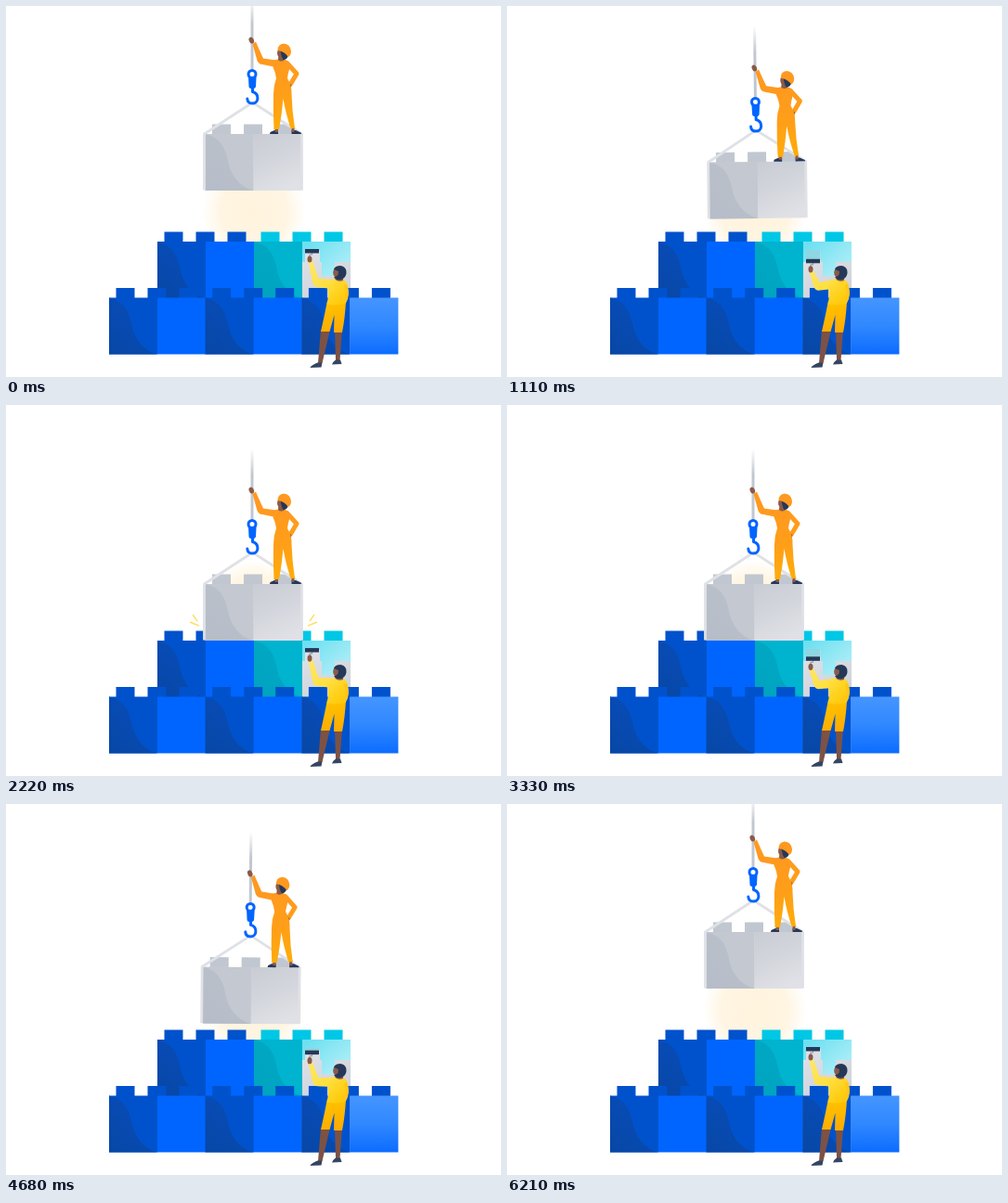
Recreate the animation shown at these times as an HTML page with a canvas. Size 533x400 px, loop 6.24 s.

```html
<!DOCTYPE html>
<html lang="en">
<head>
<meta charset="utf-8">
<title>Building blocks</title>
<style>
html, body { margin: 0; width: 100%; height: 100%; overflow: hidden; background: #fff; }
canvas { display: block; width: 533px; height: 400px; }
</style>
</head>
<body>
<canvas id="stage"></canvas>
<script>
const W = 533, H = 400, LOOP = 6240;
const canvas = document.getElementById('stage');
const dpr = window.devicePixelRatio || 1;
canvas.width = Math.round(W * dpr);
canvas.height = Math.round(H * dpr);
const c = canvas.getContext('2d');

const NAVY = '#253858', BLUE = '#0065ff', DEEP = '#0052cc', SKIN = '#8a5a48';
const clamp = v => Math.max(0, Math.min(1, v));
const span = (t, a, b) => clamp((t - a) / (b - a));
const ease = u => (1 - Math.cos(Math.PI * u)) / 2;

function grad(x0, y0, x1, y1, ...stops) {
  const g = c.createLinearGradient(x0, y0, x1, y1);
  stops.forEach((s, i) => g.addColorStop(i / (stops.length - 1), s));
  return g;
}
function rect(x, y, w, h, fill) {
  c.fillStyle = fill;
  c.fillRect(x, y, w, h);
}
function shape(d, fill) {
  c.fillStyle = fill;
  c.fill(new Path2D(d));
}
function line(d, color, width, cap = 'round') {
  c.strokeStyle = color;
  c.lineWidth = width;
  c.lineCap = cap;
  c.lineJoin = 'round';
  c.stroke(new Path2D(d));
}
function oval(x, y, rx, ry, fill, turn = 0) {
  c.beginPath();
  c.ellipse(x, y, rx, ry, turn, 0, Math.PI * 2);
  c.fillStyle = fill;
  c.fill();
}

// Brick: two halves, a curved shade on the left one, three studs on top
function brick(x, y, look) {
  c.save();
  c.translate(x, y);
  for (let i = 0; i < 3; i++) rect(7.5 + 34 * i, -10.5, 20, 11, look.stud);
  rect(0, 0, 52.3, 61, look.left);
  shape('M0 0C14 3 21 12 24 27C27 45 37 57 52 61L0 61Z', look.shade());
  rect(52, 0, 52, 61, look.right());
  c.restore();
}
const blue = {
  stud: DEEP, left: DEEP,
  shade: () => grad(0, 61, 40, 10, '#0747a6', '#084cb8'),
  right: () => BLUE
};
const sky = { ...blue, right: () => grad(0, 0, 0, 61, '#4595ff', '#3088ff', '#0c6cff') };
const teal = {
  stud: '#00c7e5', left: '#00b3cf',
  shade: () => grad(0, 61, 40, 10, '#00a3bf', '#00a8c4'),
  right: () => grad(0, 0, 52, 61, '#62dff0', '#6fe0f1', '#a5ecf6')
};
const grey = {
  stud: '#c1c7d0', left: '#c3c8d1',
  shade: () => grad(0, 61, 40, 10, '#b6bdc8', '#b9c0ca'),
  right: () => grad(52, 0, 80, 61, '#c9ccd4', '#d3d5dc', '#dfe1e6')
};

function glow() {
  c.save();
  c.beginPath();
  c.rect(205, 170, 125, 84);
  c.clip();
  const g = c.createRadialGradient(267, 222, 0, 267, 222, 56);
  g.addColorStop(0, '#fff3dc');
  g.addColorStop(0.65, '#fff5e2');
  g.addColorStop(1, 'rgba(255,247,232,0)');
  rect(205, 165, 125, 90, g);
  c.restore();
}

function woman() {
  const suit = grad(285, 60, 305, 135, '#ff991f', '#ff9f18', '#ffae08');
  oval(264.3, 37, 2.6, 3.6, SKIN, -0.4);
  shape('M284 138L284.500 136L289 134H293V138Z', NAVY);
  shape('M307.500 134L312 134L317.500 136.500L318 138H307.500Z', NAVY);
  shape('M289.500 130H293V136H289.500ZM307.500 130H310.500V136H307.500Z', SKIN);
  // far arm resting on the hip
  line('M303 62L313 73L306.500 84', suit, 5);
  oval(305, 87, 2, 3, SKIN, 0.5);
  // near arm reaching for the rope
  shape('M265.500 41L269 38.500Q273 48 277 56.500L291 58.500L291 66L273.500 62.500Q271.500 61.500 270.500 59Z', suit);
  shape('M287.500 59Q295 56 302 58.500Q306 60 306 65Q303.500 73 303 78Q308 86 307.500 95Q308 113 311 132H306.500Q301 115 298.500 100Q297 117 294 133H288.500Q287.500 114 288 95Q288 86 291 78Q290 71 287.500 66Z', suit);
  shape('M293.500 52H300V58Q296 61 293 58Z', SKIN);
  oval(295.8, 50.2, 3.7, 5.2, SKIN, 0.15);
  shape('M295.500 47Q303 46 304 53Q303 58 298.500 58Q296 54 295.500 47Z', NAVY);
  shape('M292.500 48Q292.500 41 299 40.500Q306 41 307 48.500Q307 53 304 55Q300 49 292.500 48Z', '#ff991f');
}

function hook() {
  c.beginPath();
  c.arc(265, 73.500, 4, 0, Math.PI * 2);
  c.strokeStyle = BLUE;
  c.lineWidth = 3;
  c.stroke();
  shape('M261 77H269.500L269 87Q268.500 89 266.500 89H264Q261.500 89 261.500 87Z', BLUE);
  line('M265.500 88V92.500C273 94.500 272.500 105 265.500 105C262 105 260 103 259.800 100', BLUE, 3);
}

function load(t) {
  const dy = 55 * (ease(span(t, 170, 1950)) - ease(span(t, 4304, 5306)));
  const turn = -0.011 * Math.sin(Math.PI * span(t, 170, 1950))
    + 0.012 * Math.sin(Math.PI * span(t, 4300, 5900));
  c.save();
  c.translate(265, dy - 150);
  c.rotate(turn);
  c.translate(-265, 150);
  rect(263.500, -8, 3, 78, grad(0, -8, 0, 20, 'rgba(193,199,208,0)', '#c1c7d0'));
  brick(214.500, 138, grey);
  line('M213.500 198.500V138L265.500 104L318.500 138V198.500', '#dfe1e6', 2.8, 'butt');
  hook();
  woman();
  c.restore();
}

function sparks(t) {
  const u = span(t, 1930, 2420);
  if (u <= 0 || u >= 1) return;
  const go = 1 - (1 - u) * (1 - u);
  c.save();
  c.globalAlpha = clamp((1 - u) * 2.2);
  const ray = (x, y, dx, dy, len) => {
    const a = go * 1.15, b = Math.max(0, a - len);
    line(`M${x + dx * b} ${y + dy * b}L${x + dx * a} ${y + dy * a}`, '#ffd84a', 1.5);
  };
  for (const [x, s] of [[213, -1], [320, 1]]) {
    ray(x, 243, s * 12, -17, 0.35);
    ray(x, 240, s * 15, -6, 0.6);
  }
  c.restore();
}

// Unpainted patch and the roller moving over it
function wall(s) {
  const bare = grad(319, 260, 350, 315, '#e1e3e8', '#cfd3da');
  shape('M319 276H322V264H338V276H340V291H354V276H371V315H319Z', bare);
  rect(322, 263, 15.500, s, '#8ed6e2');
}

function painter(s) {
  const hx = 327, hy = 272 + s;
  line(`M${hx} ${hy}V${hy - 4}H329.500V${hy - 6}`, '#97a0af', 1.2);
  rect(322, 262 + s, 15, 4.500, NAVY);
  // legs and shoes
  shape('M339 349H349L340.500 385H336Z', '#7d5244');
  shape('M354 349H362L359.500 382H355Z', '#7d5244');
  shape('M327.500 390Q328 387.500 335.500 384.500H340.500L339.500 389.500Z', '#344563');
  shape('M351 386.500Q351.500 384 355 381.500H360L361.500 386Z', '#344563');
  shape('M346 318H366Q365 337 362 352H353L353.500 333L348.500 351H339Q343 333 346 318Z',
    grad(345, 318, 355, 352, '#ffc400', '#ffab00'));
  // raised arm
  const ey = 300 + s * 0.35;
  const sleeve = grad(326, 278, 356, 306, '#ffe766', '#ffdd33');
  shape(`M${hx - 1.5} ${hy + 4}L${hx + 3} ${hy + 3}L336.500 ${ey - 6}L352 295L351 305L335 ${ey + 3}Q331.500 ${ey + 2.5} 330.500 ${ey - 1}Z`, sleeve);
  oval(hx, hy + 1, 2.5, 3.6, SKIN);
  shape('M348 296Q355 292.500 364 295.500Q368.500 298 368.500 308Q368.500 316 365.500 321Q355 323.500 345.500 321.500Q348 311 346 303Z',
    grad(345, 296, 368, 322, '#ffe24a', '#ffd21f', '#ffc400'));
  line('M366 302Q369 312 364.500 319', '#ffc61a', 3.5);
  // head
  shape('M354 289H363V296Q358 298 354.500 295Z', SKIN);
  oval(355.5, 287.5, 3.3, 5, SKIN);
  shape('M353 284Q354 280 360.500 280Q367 281.500 366.500 288Q366 293 361 295Q356 296 353 292.500Q355.500 291.500 357.500 290L358 286Z', NAVY);
}

function draw(t) {
  c.setTransform(dpr, 0, 0, dpr, 0, 0);
  rect(0, 0, W, H, '#fff');
  const p = Math.pow((1 - Math.cos(t / LOOP * 6 * Math.PI)) / 2, 1.6);
  const s = 11 * p;
  glow();
  brick(163, 254, blue);
  brick(267, 254, teal);
  wall(s);
  brick(111, 314.500, blue);
  brick(214.700, 314.500, blue);
  brick(318.400, 314.500, sky);
  sparks(t);
  load(t);
  painter(s);
}

const start = performance.now();
function tick() {
  draw((performance.now() - start) % LOOP);
  requestAnimationFrame(tick);
}
tick();
</script>
</body>
</html>
```
